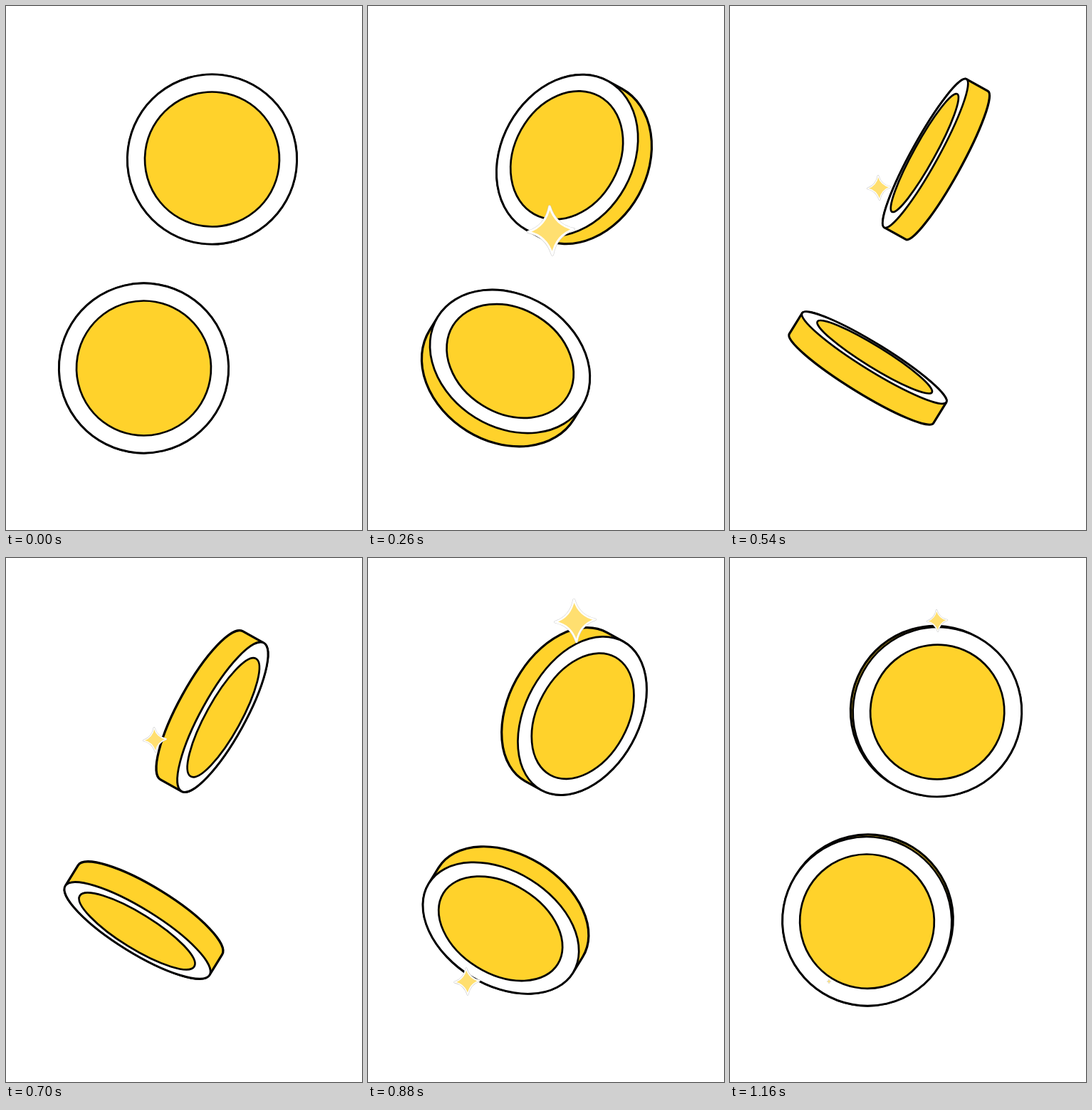
These frames come from a looping animation (500x735 px, 1180 ms). An HTML page with a canvas:

```html
<!DOCTYPE html>
<html lang="en">
<head>
<meta charset="utf-8">
<title>Spinning coins</title>
<style>
  html, body { margin: 0; width: 100%; height: 100%; overflow: hidden; background: #fff; }
  canvas { display: block; }
</style>
</head>
<body>
<canvas id="stage" width="500" height="735"></canvas>
<script>
const ctx = document.getElementById('stage').getContext('2d');
const LOOP = 1180, STEP = 20, HALF_TURN = 1200;
const GOLD = '#ffd22b', PALE = '#ffdf70', INK = '#000', EDGE = '#cfcfcf';

// the inner disc sits slightly proud of the rim
const RIM = { radius: 119, depth: 17.5 };
const CORE = { radius: 94.5, depth: 18.7 };

// axis: direction in degrees that the first face turns towards
const coins = [
  { x: 289.5, y: 215, axis: 209 },
  { x: 193.5, y: 508, axis: -58.3 }
];

// each sparkle grows linearly to its size at peak, then shrinks again
const sparkles = [
  { x: 257, y: 315, size: 44, peak: 220, span: 200 },
  { x: 209, y: 255, size: 29, peak: 620, span: 200 },
  { x: 291, y: 88, size: 77, peak: 1000, span: 200 },
  { x: 139, y: 594, size: 38.5, peak: 978, span: 195 }
];

function outline(color, width) {
  ctx.strokeStyle = color;
  ctx.lineWidth = width;
  ctx.stroke();
}

function paint(fill, line, width) {
  ctx.fillStyle = fill;
  ctx.fill();
  outline(line, width);
}

function disc(x, radius, squash, fill) {
  ctx.beginPath();
  ctx.ellipse(x, 0, radius * squash, radius, 0, 0, Math.PI * 2);
  paint(fill, INK, 2.7);
}

function drawCoin({ x, y, axis }, turn) {
  const squash = Math.abs(Math.cos(turn));
  const lift = Math.sin(turn);
  const side = Math.cos(turn) >= 0 ? lift : -lift;
  const depth = RIM.depth * lift;
  const quarter = Math.PI / 2;

  ctx.save();
  ctx.translate(x, y);
  ctx.rotate(axis * Math.PI / 180);
  ctx.lineJoin = 'round';

  ctx.beginPath();
  ctx.ellipse(depth, 0, RIM.radius * squash, RIM.radius, 0, -quarter, quarter);
  ctx.ellipse(-depth, 0, RIM.radius * squash, RIM.radius, 0, quarter, 3 * quarter);
  ctx.closePath();
  paint(GOLD, INK, 3.2);

  disc(RIM.depth * side, RIM.radius, squash, '#fff');
  disc(CORE.depth * side, CORE.radius, squash, GOLD);
  ctx.restore();
}

function drawSparkle({ x, y, size, peak, span }, time) {
  const r = size * (1 - Math.abs(time - peak) / span);
  if (r <= 0) return;
  const tall = r * 0.96, wide = r * 0.91, waist = r * 0.19;
  const border = r * 0.08;

  ctx.save();
  ctx.translate(x, y);
  ctx.rotate(-0.06);
  ctx.lineJoin = 'round';
  ctx.beginPath();
  ctx.moveTo(0, -tall);
  ctx.quadraticCurveTo(waist, -waist, wide, 0);
  ctx.quadraticCurveTo(waist, waist, 0, tall);
  ctx.quadraticCurveTo(-waist, waist, -wide, 0);
  ctx.quadraticCurveTo(-waist, -waist, 0, -tall);
  ctx.closePath();
  outline(EDGE, border + 1.2);
  paint(PALE, '#fff', border);
  ctx.restore();
}

const start = performance.now();

function render() {
  const elapsed = (performance.now() - start) % LOOP;
  const time = Math.floor(elapsed / STEP) * STEP;
  ctx.fillStyle = '#fff';
  ctx.fillRect(0, 0, 500, 735);
  coins.forEach(coin => drawCoin(coin, Math.PI * time / HALF_TURN));
  sparkles.forEach(sparkle => drawSparkle(sparkle, time));
  requestAnimationFrame(render);
}

render();
</script>
</body>
</html>
```
